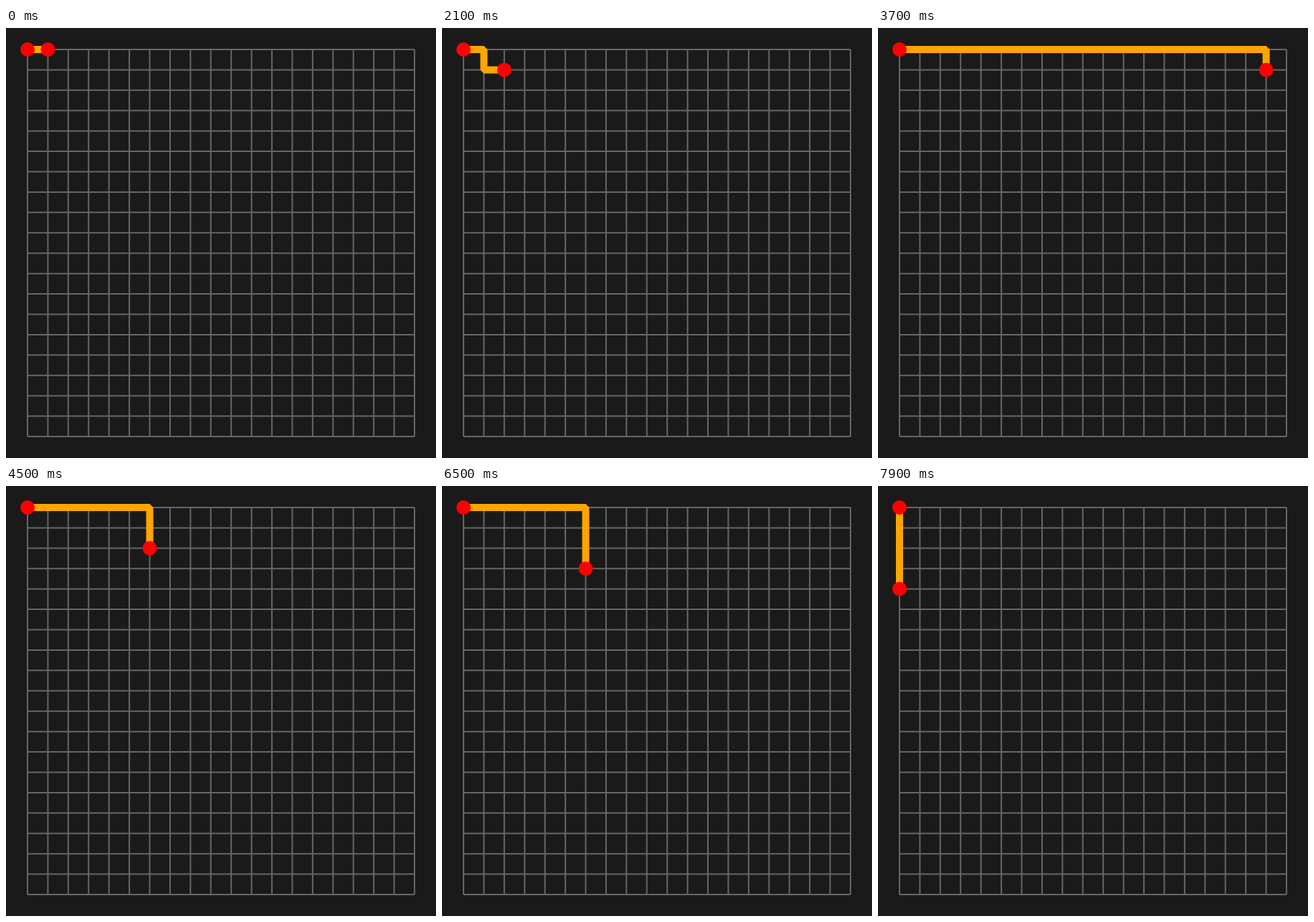
Recreate the animation shown at these times as an HTML page. Size 600 by 600 pixels, loop 8 s.

```html
<!DOCTYPE html>
<html lang="en">
<head>
<meta charset="utf-8">
<title>Shortest paths on a grid</title>
<style>
  html, body { margin: 0; width: 100%; height: 100%; overflow: hidden; background: #1a1a1a; }
  svg { display: block; width: 600px; height: 600px; fill: none; }
  #grid { stroke: #666; stroke-width: 2; }
  #route { stroke: #ffa500; stroke-width: 10; stroke-linejoin: bevel; }
  circle { fill: #f00; }
</style>
</head>
<body>
<svg viewBox="0 0 600 600">
  <path id="grid"/>
  <polyline id="route"/>
  <circle cx="30" cy="30" r="10"/>
  <circle id="goal" r="10"/>
</svg>
<script>
const SIZE = 20, MARGIN = 30, STEP = 540 / (SIZE - 1);
const FRAME_MS = 100, FRAMES = 80;
const at = i => MARGIN + i * STEP;
const point = v => [at(v % SIZE), at(Math.floor(v / SIZE))];

// Binary min-heap; equal costs favour the right child when sifting down.
class Heap {
  items = [];
  push(item) {
    const h = this.items;
    let i = h.length;
    while (i > 0) {
      const parent = (i - 1) >> 1;
      if (item.cost >= h[parent].cost) break;
      h[i] = h[parent];
      i = parent;
    }
    h[i] = item;
  }
  pop() {
    const h = this.items, top = h[0], last = h.pop();
    if (!h.length) return top;
    let i = 0;
    for (let l = 1; l < h.length; l = 2 * i + 1) {
      const r = l + 1;
      const child = r >= h.length || h[l].cost < h[r].cost ? l : r;
      if (h[child].cost >= last.cost) break;
      h[i] = h[child];
      i = child;
    }
    h[i] = last;
    return top;
  }
}

function neighbours(v) {
  const x = v % SIZE, list = [];
  if (v >= SIZE) list.push(v - SIZE);
  if (x > 0) list.push(v - 1);
  if (x < SIZE - 1) list.push(v + 1);
  if (v < SIZE * (SIZE - 1)) list.push(v + SIZE);
  return list;
}

// Shortest-path tree from the top left corner, all edges of length 1.
function searchTree() {
  const cost = new Array(SIZE * SIZE).fill(Infinity), parent = [];
  const open = new Heap();
  cost[0] = 0;
  open.push({ v: 0, cost: 0 });
  while (open.items.length) {
    const { v } = open.pop();
    for (const n of neighbours(v)) {
      const next = cost[v] + 1;
      if (next >= cost[n]) continue;
      cost[n] = next;
      parent[n] = v;
      open.push({ v: n, cost: next });
    }
  }
  return parent;
}

const parent = searchTree();
const route = document.getElementById("route");
const goal = document.getElementById("goal");

let lines = "";
for (let i = 0; i < SIZE; i++) {
  lines += `M${at(i)} 30V570M30 ${at(i)}H570`;
}
document.getElementById("grid").setAttribute("d", lines);

let shown = -1;
function show(target) {
  if (target === shown) return;
  shown = target;
  const points = [];
  for (let v = target; v !== undefined; v = parent[v]) points.unshift(point(v));
  route.setAttribute("points", points.join(" "));
  const [x, y] = point(target);
  goal.setAttribute("cx", x);
  goal.setAttribute("cy", y);
}

let start;
function tick(now) {
  start ??= now;
  show(Math.floor((now - start) / FRAME_MS) % FRAMES + 1);
  requestAnimationFrame(tick);
}
show(1);
requestAnimationFrame(tick);
</script>
</body>
</html>
```
